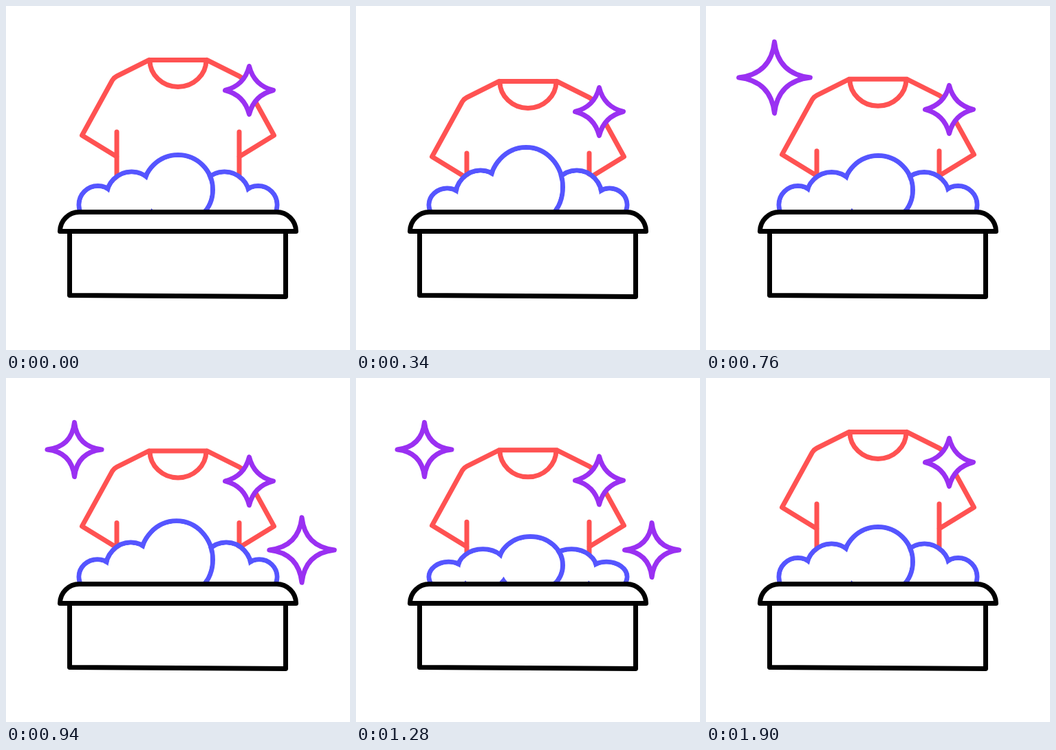
An HTML page with a canvas that plays this animation: 500x500 px, repeating every 2 s.

```html
<!DOCTYPE html>
<html lang="en">
<head>
<meta charset="utf-8">
<title>Laundry</title>
<style>
html, body { margin: 0; width: 100%; height: 100%; overflow: hidden; background: #fff; }
canvas { display: block; width: 500px; height: 500px; }
</style>
</head>
<body>
<canvas id="stage" width="500" height="500"></canvas>
<script>
const ctx = document.getElementById('stage').getContext('2d');
const LOOP = 2000, LINE = 7;
const RED = '#ff5252', BLUE = '#5555ff', PURPLE = '#9a30f2', BLACK = '#000';

// Key points: time, value
const shirtKeys = [[0, 0], [340, 31], [580, 28], [1240, 27], [1650, 0]];
const foamKeys = [[0, 0], [330, 11], [610, -8], [950, 8.7], [1270, -14], [1690, 0]];
const leftKeys = pop(550, 1460);
const rightKeys = pop(780, 1665);

// A star swells past its resting size both when it enters and before it leaves
function pop(enter, leave) {
  const size = 39.5, peak = 52;
  return [
    [enter, 0], [enter + 200, peak], [enter + 400, size],
    [leave - 150, size], [leave, peak], [leave + 230, 0]
  ];
}

const ease = p => (1 - Math.cos(Math.PI * p)) / 2;

function track(keys, t) {
  const next = keys.findIndex(k => t < k[0]);
  if (next === 0) return keys[0][1];
  if (next < 0) return keys[keys.length - 1][1];
  const [t0, a] = keys[next - 1], [t1, b] = keys[next];
  return a + (b - a) * ease((t - t0) / (t1 - t0));
}

function paint(color, build, filled) {
  ctx.beginPath();
  build();
  if (filled) {
    ctx.fillStyle = '#fff';
    ctx.fill();
  }
  ctx.strokeStyle = color;
  ctx.lineWidth = LINE;
  ctx.stroke();
}

function star(x, y, r, pinch) {
  if (r < 0.3) return;
  const c = r * pinch;
  paint(PURPLE, () => {
    ctx.moveTo(x, y - r);
    ctx.quadraticCurveTo(x + c, y - c, x + r, y);
    ctx.quadraticCurveTo(x + c, y + c, x, y + r);
    ctx.quadraticCurveTo(x - c, y + c, x - r, y);
    ctx.quadraticCurveTo(x - c, y - c, x, y - r);
    ctx.closePath();
  }, true);
}

function shirt() {
  const top = 78.5;
  paint(RED, () => {
    ctx.moveTo(208, top);
    ctx.lineTo(292, top);
    for (const side of [-1, 1]) {
      const at = x => 250 + side * x;
      ctx.moveTo(at(42), top);
      ctx.lineTo(at(89), 102);
      ctx.quadraticCurveTo(at(93), 104, at(95.5), 108);
      ctx.lineTo(at(139.5), 188);
      ctx.lineTo(at(89), 219);
      ctx.moveTo(at(89), 183);
      ctx.lineTo(at(89), 290);
    }
    ctx.moveTo(291, top);
    ctx.ellipse(250, top, 41, 39, 0, 0, Math.PI);
  }, false);
  star(353.5, 122.5, 35, 0.2);
}

// Strokes every bubble, then clears the insides, leaving one joint outline
function cloud(bubbles) {
  for (const [x, y, rx, ry] of bubbles) {
    paint(BLUE, () => ctx.ellipse(x, y, rx, ry, 0, 0, Math.PI * 2), false);
  }
  ctx.fillStyle = '#fff';
  for (const [x, y, rx, ry] of bubbles) {
    ctx.beginPath();
    ctx.ellipse(x, y, rx - LINE / 2, ry - LINE / 2, 0, 0, Math.PI * 2);
    ctx.fill();
  }
}

// Outer and middle bubble of one side, stretched by u
function sideBubbles(side, u) {
  const lean = u * (side > 0 ? 0.18 : 0.08);
  const outer = [250 + side * (116.5 + lean), 289, 27.5 - lean, 27.5 - 0.03 * u * u];
  const middle = [250 + side * (67.5 + 1.7 * lean), 278, 36.8, 37 + 0.35 * u - 0.015 * u * u];
  return [outer, middle];
}

function foam(u) {
  const big = [250 - u / 4, 267 - 0.35 * u, 50.5 + u / 4, 50.5 + 0.65 * u];
  cloud(sideBubbles(1, u));
  cloud([...sideBubbles(-1, u), big]);
}

function tub() {
  paint(BLACK, () => {
    ctx.moveTo(92.5, 327);
    ctx.lineTo(92.5, 420.5);
    ctx.lineTo(406.5, 422.5);
    ctx.lineTo(406.5, 327);
  }, true);
  paint(BLACK, () => {
    ctx.moveTo(78.5, 327.5);
    ctx.arc(106.5, 327.5, 28, Math.PI, Math.PI * 1.5);
    ctx.arc(393.5, 327.5, 28, -Math.PI / 2, 0);
    ctx.closePath();
  }, true);
}

function draw(t) {
  ctx.fillStyle = '#fff';
  ctx.fillRect(0, 0, 500, 500);
  ctx.lineCap = ctx.lineJoin = 'round';

  ctx.save();
  ctx.translate(0, track(shirtKeys, t));
  shirt();
  ctx.restore();

  foam(track(foamKeys, t));
  tub();
  star(99.5, 104, track(leftKeys, t), 0.1);
  star(430, 250, track(rightKeys, t), 0.1);
}

const start = performance.now();
function tick() {
  draw((performance.now() - start) % LOOP);
  requestAnimationFrame(tick);
}
tick();
</script>
</body>
</html>
```
